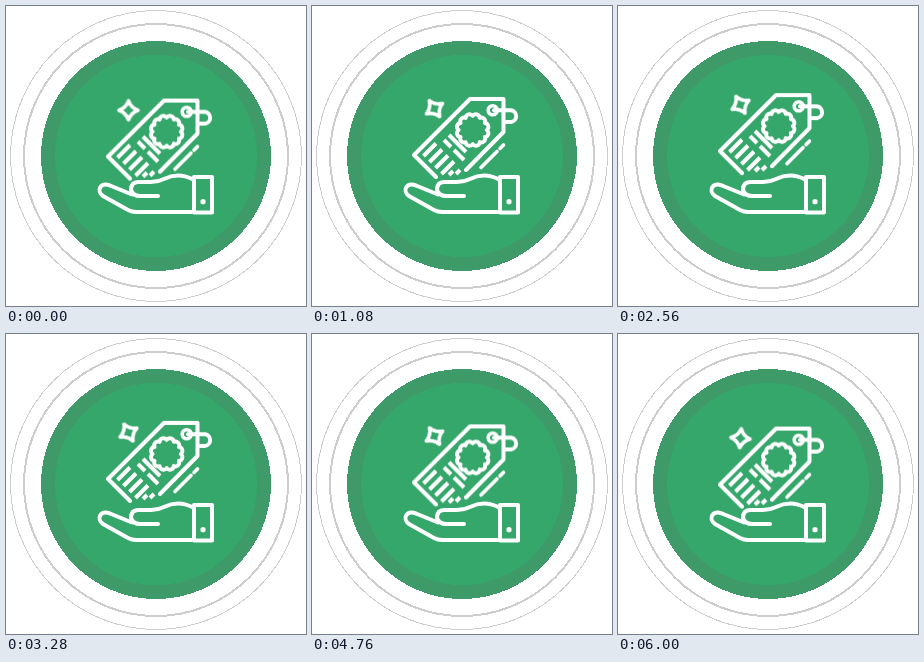
An HTML page without scripts for the animation above (6040 ms loop, 300 by 300 pixels).

```html
<!DOCTYPE html>
<html lang="en">
<head>
<meta charset="utf-8">
<title>Price tag in hand</title>
<style>
  html, body { margin: 0; width: 100%; height: 100%; overflow: hidden; background: #fff; }
  svg { display: block; width: 100vw; height: 100vh; }
  .disc { shape-rendering: crispEdges; }
  .icon { fill: none; stroke: #fff; stroke-width: 4; stroke-linecap: round; stroke-linejoin: round; }
  .thin { stroke-width: 3.6; }
  .bars { stroke-linecap: butt; }
  .dot { fill: #fff; stroke: none; }
  .bob { animation: bob 3020ms cubic-bezier(.37, 0, .63, 1) infinite alternate; }
  .turn { animation: turn 3020ms cubic-bezier(.16, 1, .3, 1) infinite alternate; }
  @keyframes bob { to { transform: translateY(-5.8px); } }
  @keyframes turn { to { transform: rotate(62deg); } }
</style>
</head>
<body>
<svg viewBox="0 0 300 300">
  <g class="disc">
    <g fill="none" stroke="#cdcdcd">
      <circle cx="150" cy="150" r="145.5"/>
      <circle cx="150" cy="150" r="132" stroke-width="2"/>
    </g>
    <circle cx="150" cy="150" r="115" fill="#3e9b69"/>
    <circle cx="150" cy="150" r="101" fill="#36a76b"/>
  </g>

  <g class="icon">
    <!-- hand -->
    <path d="M152 190H134Q127 190 125 184Q125 176 132 176H145Q152 176 158 173C168 168 179 169 188 174"/>
    <path d="M126 188.5L104 179.5C94 176 90 185 97 190L122 204Q126 206 130 206H188"/>
    <path d="M188 171H206V206.500H188Z"/>
    <circle class="dot" cx="197" cy="195.700" r="2.600"/>

    <g transform="translate(0 .6)">
      <g class="bob">
        <!-- tag -->
        <path d="M124 172L102 150L158 94H191.500V127L154 165"/>
        <circle class="thin" cx="180.700" cy="105.300" r="4.500"/>
        <path d="M182 105.300H199A5.900 5.900 0 0 1 199 117H194"/>
        <g class="bars">
          <path d="M111.500 151L124 138.500M117.500 157L130 144.500M123.500 163L136 150.500M129.500 169L142 156.500M137 170L141 166M144 169L148 165"/>
          <path d="M132 135L139 142M142 145L152 155M137 130L154 147"/>
        </g>
        <path class="thin" d="M191.500 140L188 143.500M185 146.500L169 162.500"/>

        <!-- seal -->
        <path class="thin" transform="translate(160.700 125) scale(1.060)" d="M0-13.200
          a3.600 3.600 0 0 1 6.600 1.800a3.600 3.600 0 0 1 4.800 4.800a3.600 3.600 0 0 1 1.800 6.600
          a3.600 3.600 0 0 1-1.800 6.600a3.600 3.600 0 0 1-4.800 4.800a3.600 3.600 0 0 1-6.600 1.800
          a3.600 3.600 0 0 1-6.600-1.800a3.600 3.600 0 0 1-4.800-4.800a3.600 3.600 0 0 1-1.800-6.600
          a3.600 3.600 0 0 1 1.800-6.600a3.600 3.600 0 0 1 4.800-4.800a3.600 3.600 0 0 1 6.600-1.800z"/>

        <!-- sparkle -->
        <g transform="translate(122.500 103.700)">
          <path class="thin turn" d="M0-9.500Q2.500-2.500 9.500 0Q2.500 2.500 0 9.500Q-2.500 2.500-9.500 0Q-2.500-2.500 0-9.500Z"/>
        </g>
      </g>
    </g>
  </g>
</svg>
</body>
</html>
```
